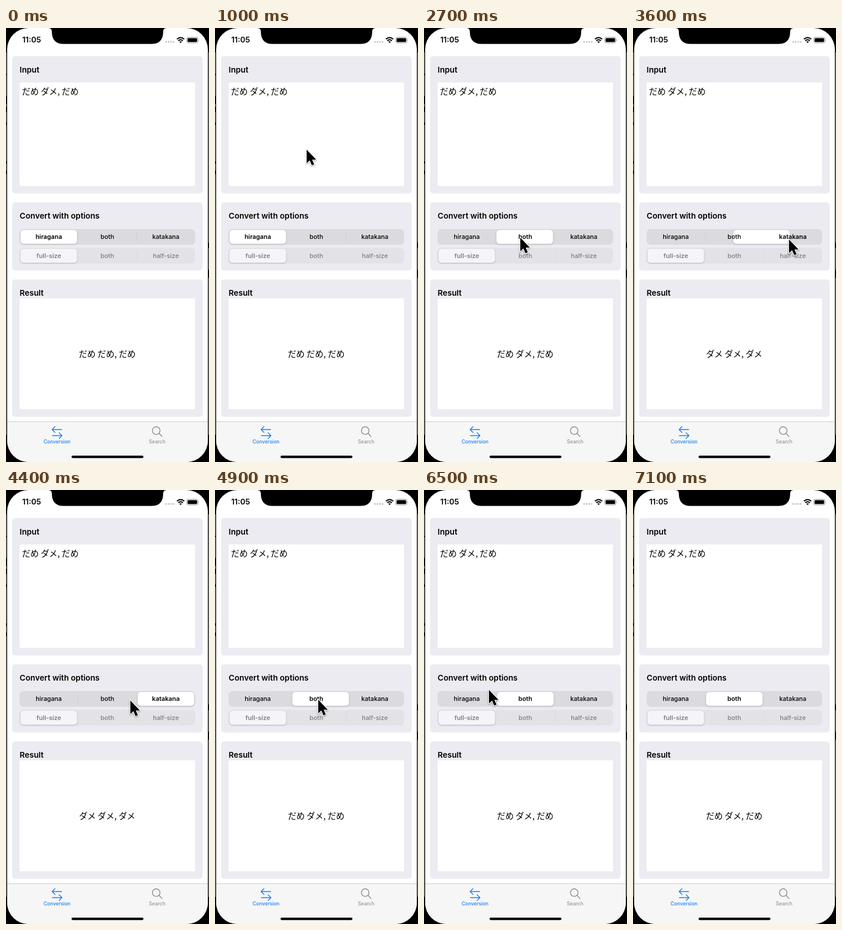
Animation, 350 px wide and 749 px high, one loop 7.8 s. Source, as an HTML page:

```html
<!DOCTYPE html>
<html lang="ja">
<head>
<meta charset="utf-8">
<title>Kana conversion</title>
<style>
  html, body { margin: 0; width: 100%; height: 100%; overflow: hidden; background: #000; }
  svg { display: block; font-family: Inter, sans-serif; }
  .card { fill: #ebebf1; }
  .title { font-size: 13.7px; font-weight: 600; }
  .kana { font: 300 14.6px "Noto Sans CJK JP", "Noto Sans CJK", sans-serif; }
  .option { font-size: 10.8px; font-weight: 500; text-anchor: middle; }
  .option .on { font-weight: 600; }
  .tab { font-size: 8.5px; font-weight: 500; text-anchor: middle; }
  .thumb { filter: drop-shadow(0 1.5px 1.5px #0003); }
  .line { fill: none; stroke-width: 1.4; stroke-linecap: round; stroke-linejoin: round; }
</style>
</head>
<body>
<svg width="350" height="749" viewBox="0 0 350 749">
  <defs>
    <clipPath id="screen"><rect x="2" y="0" width="346" height="749" rx="37"/></clipPath>
  </defs>
  <path d="M.4 42V702M349.6 42V702" stroke="#ccc" stroke-width=".8"/>
  <path d="M.4 79v2M.4 117v14M.4 136v9M.4 163v4M.4 230v4M.4 246v6M349.6 370v10M349.6 417v14" stroke="#000"/>
  <g clip-path="url(#screen)">
    <rect width="350" height="749" fill="#fff"/>
    <rect y="679" width="350" height="70" fill="#f6f6f6"/>
    <rect y="679" width="350" height="1" fill="#cfcfd1"/>
  </g>
  <path d="M73 0Q79 0 79 6Q79 27.5 99 27.5H251Q271 27.5 271 6Q271 0 277 0Z"/>

  <text x="28" y="25.3" font-size="13.3" font-weight="600">11:05</text>
  <g fill="#c3c3c3">
    <circle cx="276" cy="24" r="1.5"/><circle cx="280.3" cy="24" r="1.5"/>
    <circle cx="284.6" cy="24" r="1.5"/><circle cx="288.9" cy="24" r="1.5"/>
  </g>
  <g fill="none" stroke="#000" stroke-width="2">
    <path d="M294.7 19.3Q301 13.6 307.3 19.3M297 22Q301 18.4 305 22"/>
    <path d="M301 26L298.8 23.8Q301 22 303.2 23.8Z" fill="#000" stroke="none"/>
  </g>
  <rect x="311.5" y="16" width="19.5" height="9.8" rx="2.8" fill="none" stroke="#999"/>
  <rect x="313" y="17.5" width="16.5" height="6.8" rx="1.5"/>
  <path d="M332 19.2q1.4 1.7 0 3.4z" fill="#999"/>

  <rect class="card" x="10.5" y="48.5" width="328.5" height="237" rx="5"/>
  <rect class="card" x="10.5" y="301" width="328.5" height="117.5" rx="5"/>
  <rect class="card" x="10.5" y="434" width="328.5" height="237" rx="5"/>
  <rect x="23.5" y="94" width="302.5" height="178.5" fill="#fff"/>
  <rect x="23.5" y="466.5" width="302.5" height="191.5" fill="#fff"/>
  <text class="title" x="23.6" y="76.5">Input</text>
  <text class="title" x="23.6" y="329">Convert with options</text>
  <text class="title" x="23.6" y="462">Result</text>
  <text class="kana" x="27.5" y="114.5">だめ ダメ, だめ</text>
  <text class="kana" x="174.5" y="567.5" text-anchor="middle" id="result"></text>

  <rect x="23.5" y="347" width="302.5" height="27" rx="6.5" fill="#dadadf"/>
  <rect class="separator" x="124" y="353" width="1" height="15" fill="#cdcdd2"/>
  <rect class="separator" x="225" y="353" width="1" height="15" fill="#cdcdd2"/>
  <rect class="thumb" id="thumb" y="348.5" width="97.5" height="24" rx="5.5" fill="#fff"/>
  <g class="option" id="kinds">
    <text x="73.8" y="364">hiragana</text><text x="174.7" y="364">both</text><text x="275.6" y="364">katakana</text>
  </g>
  <rect x="23.5" y="379.5" width="302.5" height="27" rx="6.5" fill="#e2e2e7"/>
  <rect x="225" y="385.5" width="1" height="15" fill="#d9d9de"/>
  <rect class="thumb" x="25" y="381" width="97.5" height="24" rx="5.5" fill="#f5f5f9"/>
  <g class="option" fill="#7d7d82">
    <text class="on" x="73.8" y="396.7">full-size</text><text x="174.7" y="396.7">both</text><text x="275.6" y="396.7">half-size</text>
  </g>

  <path class="line" stroke="#1a7ff5" d="M96 693H79.5M84.5 688L79.5 693L84.5 698M80 703.5H96.5M91.5 698.5L96.5 703.5L91.5 708.5"/>
  <text class="tab" x="88" y="717" fill="#1a7ff5">Conversion</text>
  <g class="line" stroke="#8e8e8e"><circle cx="259" cy="694.8" r="6.6"/><path d="M263.8 699.6L269 705"/></g>
  <text class="tab" x="260.6" y="717" fill="#959595">Search</text>
  <rect x="113" y="738" width="124" height="4.2" rx="2.1"/>

  <path id="cursor" d="M0 0V23.5L5.3 18.6L9 27L13 25.2L9.4 17.2H16.5Z" stroke="#fff" stroke-width="2.4"
    paint-order="stroke" stroke-linejoin="round" style="filter: drop-shadow(0 1px 1px #0006)"/>
</svg>
<script>
  const LOOP = 7800, STEP = 100, SEGMENT = 101;
  const RESULTS = ['だめ だめ, だめ', 'だめ ダメ, だめ', 'ダメ ダメ, ダメ'];
  // Cursor stops: time, x, y
  const PATH = [
    [100, 289, 611], [200, 291, 604], [500, 291, 604], [600, 293, 585], [700, 255, 440],
    [800, 200, 280], [900, 164, 174], [1000, 158, 210], [1300, 160, 261], [2100, 166, 361],
    [2800, 166, 362], [3200, 267, 365], [3500, 269, 365], [4100, 269, 365], [4600, 178, 362],
    [4900, 178, 362], [5600, 84, 358], [6400, 84, 358], [6500, 112, 345], [6600, 205, 195],
    [6700, 272, 80], [6800, 272, 80], [7000, 271, 67]
  ];
  const $ = id => document.getElementById(id);
  const [thumb, result, cursor] = ['thumb', 'result', 'cursor'].map($);
  const kinds = [...$('kinds').children];
  const separators = document.querySelectorAll('.separator');

  function spring(t) {
    const u = Math.max(0, t) * 0.0165;
    return 1 - (1 + u) * Math.exp(-u);
  }

  function cursorAt(t) {
    const i = Math.max(1, PATH.findIndex(stop => stop[0] >= t));
    const [t0, x0, y0] = PATH[i - 1], [t1, x1, y1] = PATH[i];
    const k = (t - t0) / (t1 - t0);
    return [x0 + (x1 - x0) * k, y0 + (y1 - y0) * k];
  }

  function draw(t) {
    const selected = t < 2400 ? 0 : t < 3600 ? 1 : t < 4700 ? 2 : 1;
    const slide = spring(t - 2305) + spring(t - 3505) - spring(t - 4640);
    thumb.setAttribute('x', 25 + SEGMENT * slide);
    result.textContent = RESULTS[selected];
    kinds.forEach((label, i) => label.classList.toggle('on', i === selected));
    separators.forEach((bar, i) => bar.style.opacity = selected === i || selected === i + 1 ? 0 : 1);

    const visible = t >= 100 && t <= 7000;
    cursor.style.display = visible ? '' : 'none';
    if (visible) cursor.setAttribute('transform', `translate(${cursorAt(t)})`);
  }

  const start = performance.now();
  function tick() {
    const t = (performance.now() - start) % LOOP;
    draw(Math.floor(t / STEP) * STEP);
    requestAnimationFrame(tick);
  }
  tick();
</script>
</body>
</html>
```
